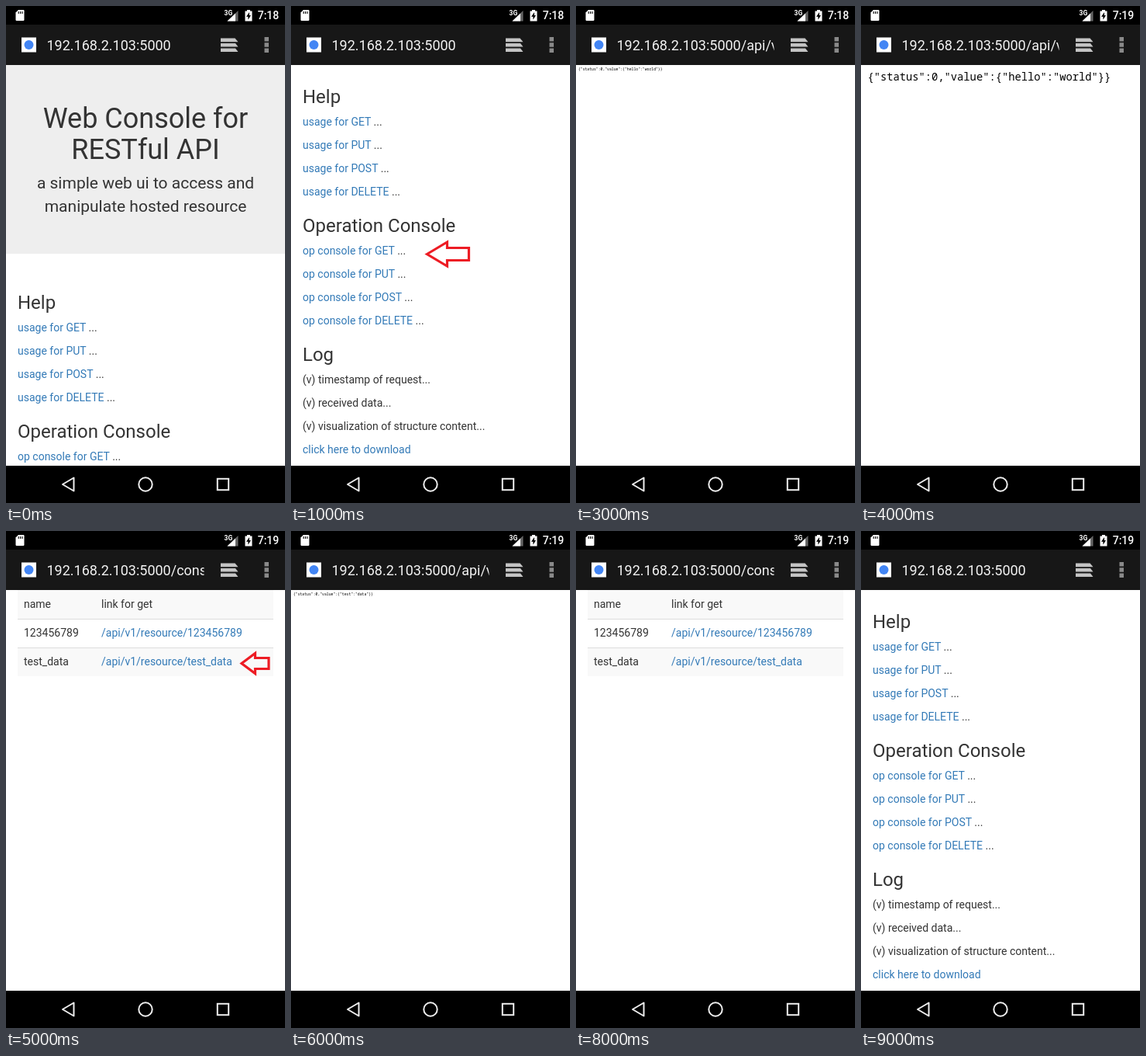
An HTML page for the animation above (10 s loop, 360 by 640 pixels).

```html
<!DOCTYPE html>
<html lang="en">
<head>
<meta charset="utf-8">
<title>Web Console for RESTful API</title>
<style>
  html, body { margin: 0; width: 100%; height: 100%; overflow: hidden; background: #000; }
  svg { display: block; width: 100%; height: 100%; }
  text { font-family: Roboto, sans-serif; font-size: 14px; fill: #333; }
  .mono { font-family: "Noto Sans Mono", monospace; fill: #000; }
  .link { fill: #337ab7; }
  .mid { text-anchor: middle; }
  .arrow { fill: none; stroke: #ed1c24; stroke-width: 3.2; }
  .nav { fill: none; stroke: #eee; stroke-width: 2; }
</style>
</head>
<body>
<svg viewBox="0 0 360 640">
  <defs><clipPath id="urlClip"><rect x="50" y="30" width="205.5" height="40"/></clipPath></defs>
  <rect y="76" width="360" height="516" fill="#fff"/>
  <g id="page"></g>

  <rect width="360" height="24"/>
  <path d="M16 5H22.3Q23.5 5 23.5 6.2V17.8Q23.5 19 22.3 19H13.7Q12.5 19 12.5 17.8V8.5Z" fill="#fff"/>
  <path d="M16.2 7v3M18.6 7v3M21 7v3" stroke="#000" stroke-width="1.1"/>
  <path d="M299.5 6V19.5H285.5Z" fill="#666"/>
  <path d="M296 9.5V19.5H285.5Z" fill="#fff"/>
  <text x="281.5" y="11.5" style="font-size:8.5px;font-weight:700;fill:#fff">3G</text>
  <path d="M311 5h4v1.5h2.5V19.5h-9V6.5H311Z" fill="#fff"/>
  <path d="M314 8L310 13.8h2.4V17.8L316 12h-2Z" fill="#000"/>
  <text id="clock" x="324.7" y="17.3" style="font-weight:500;fill:#fff"></text>

  <rect y="24" width="360" height="52" fill="#171717"/>
  <rect x="20" y="40.5" width="19" height="19" fill="#fff"/>
  <circle cx="29.5" cy="50" r="6" fill="#4285f4"/>
  <g clip-path="url(#urlClip)"><text id="url" x="52.5" y="57.2" style="font-size:18px;fill:#f2f2f2"></text></g>
  <path d="M277 41.5H295.5L299.5 46.2H277ZM277 48H296L299.5 52.6H277ZM277 54.4H296L299.5 59H277Z" fill="#c4c4c4"/>
  <path d="M333.5 40h5.5v5.5h-5.5zM333.5 47.3h5.5v5.5h-5.5zM333.5 54.6h5.5v5.5h-5.5z" fill="#8a8a8a"/>

  <rect y="592" width="360" height="48"/>
  <path class="nav" d="M87.5 607.5V624.5L73 616Z" stroke-linejoin="round"/>
  <circle class="nav" cx="180" cy="616" r="8.7"/>
  <rect class="nav" x="272.8" y="608.8" width="14.4" height="14.4"/>
</svg>
<script>
const STEP = 1000;
const HOST = "192.168.2.103:5000";
const API = "/api/v1/resource/";
const el = id => document.getElementById(id);

const text = (x, y, s, cls = "", size = 14) =>
  `<text x="${x}" y="${y}" class="${cls}" style="font-size:${size}px">${s}</text>`;
const rect = (x, y, w, h, fill) =>
  `<rect x="${x}" y="${y}" width="${w}" height="${h}" fill="${fill}"/>`;
const link = s => `<tspan class="link">${s}</tspan>`;

// Left-pointing outline arrow: tip, head length, total length, half heights
const arrow = (x, y, head, len, wing, shaft) =>
  `<path class="arrow" d="M${x} ${y}l${head} ${-wing}v${wing - shaft}H${x + len}v${2 * shaft}H${x + head}v${wing - shaft}Z"/>`;

const verbs = ["GET", "PUT", "POST", "DELETE"];
const sections = [
  ["Help", verbs.map(v => link("usage for " + v) + " ...")],
  ["Operation Console", verbs.map(v => link("op console for " + v) + " ...")],
  ["Log", ["(v) timestamp of request...", "(v) received data...",
    "(v) visualization of structure content...", link("click here to download")]]
];

function home(scroll) {
  const top = 76 - scroll;
  let out = rect(0, top, 360, 243, "#eee")
    + text(180, top + 81, "Web Console for", "mid", 36)
    + text(180, top + 120.5, "RESTful API", "mid", 36)
    + text(180, top + 159, "a simple web ui to access and", "mid", 21)
    + text(180, top + 189, "manipulate hosted resource", "mid", 21);
  sections.forEach(([title, lines], i) => {
    const y = top + 314 + i * 166;
    out += text(15, y, title, "", 24);
    lines.forEach((s, j) => out += text(15, y + 29 + j * 30, s));
  });
  return out;
}

function table() {
  const rows = [["name", "link for get"],
    ...["123456789", "test_data"].map(n => [n, link(API + n)])];
  return rows.map(([name, cell], i) => {
    const y = 76 + i * 37;
    return (i % 2 ? "" : rect(15, y, 330, 37, "#f9f9f9"))
      + (i ? rect(15, y, 330, 1, "#ddd") : "")
      + text(23, y + 23, name) + text(123, y + 23, cell);
  }).join("");
}

const json = (value, zoom) =>
  text(8 * zoom, 76 + 18.6 * zoom, JSON.stringify({ status: 0, value }), "mono", 13 * zoom);

const hello = { hello: "world" }, test = { test: "data" };
const fit = 360 / 980;
const scenes = [
  ["", () => home(0)],
  ["", () => home(265) + arrow(175.5, 319.5, 26, 54, 15.5, 8)],
  ["/console/get", () => table() + arrow(315.5, 132, 18, 37.5, 13.5, 7.5)],
  [API, () => json(hello, fit)],
  [API, () => json(hello, 1.06)],
  ["/console/get", () => table() + arrow(304, 170.5, 17.5, 35, 13, 7)],
  [API, () => json(test, fit)],
  [API, () => json(test, 1.236)],
  ["/console/get", table],
  ["", () => home(265)]
];

let shown = -1;
function render(ms) {
  const i = Math.floor(ms / STEP) % scenes.length;
  if (i === shown) return;
  shown = i;
  const [path, draw] = scenes[i];
  el("page").innerHTML = draw();
  el("url").textContent = HOST + path;
  el("clock").textContent = i < 4 ? "7:18" : "7:19";
}

const start = performance.now();
function tick() {
  render(performance.now() - start);
  requestAnimationFrame(tick);
}
tick();
</script>
</body>
</html>
```
